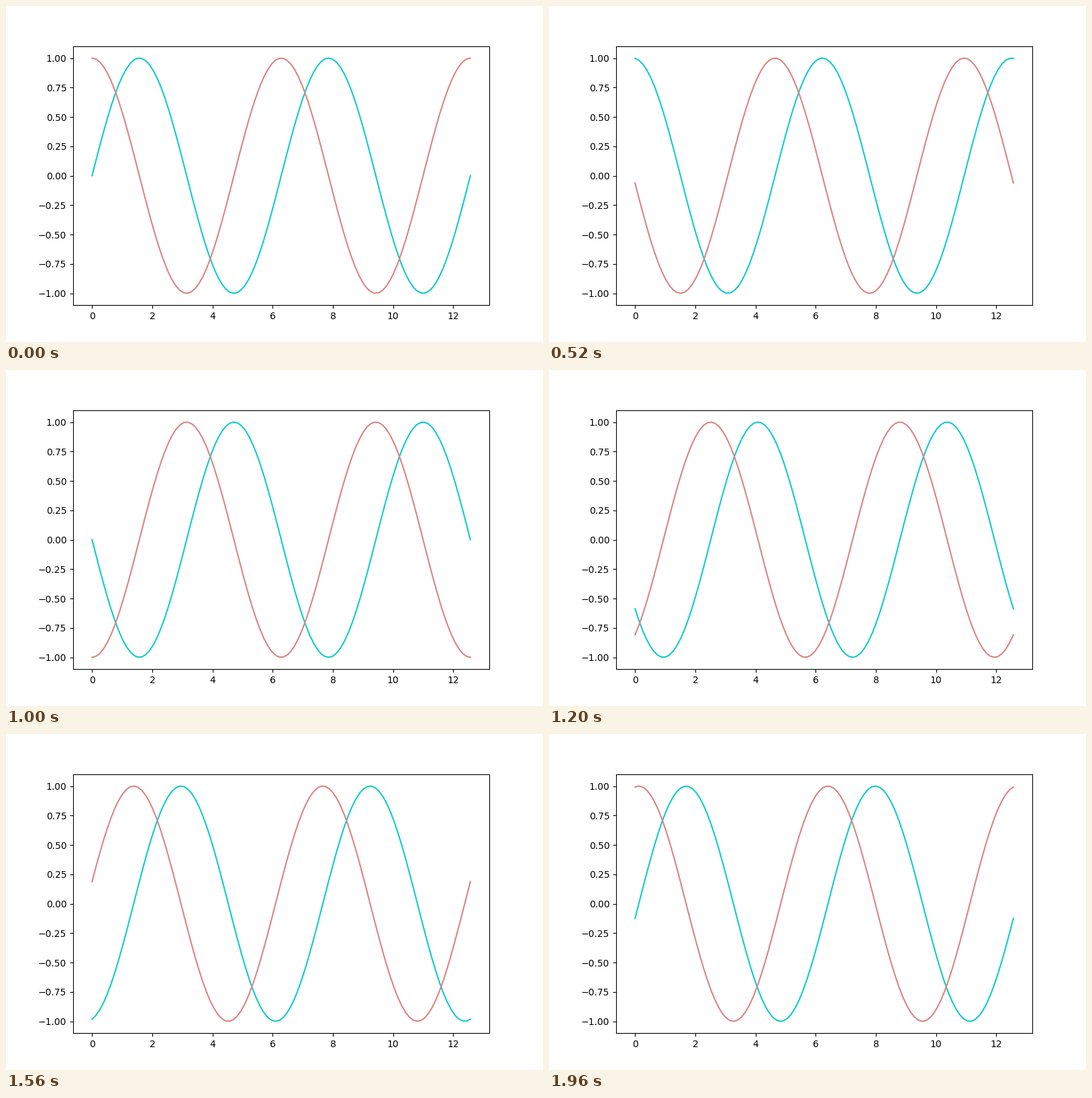
A matplotlib script that plays this animation: 800x500 px, repeating every 2 s.

```python
import numpy as np
import matplotlib.pyplot as plt
from matplotlib.animation import FuncAnimation

FRAMES = 50
INTERVAL = 40

x = np.linspace(0, 4 * np.pi, 100)

fig, ax = plt.subplots(figsize=(8, 5), dpi=100)
sin_line, = ax.plot(x, np.sin(x), color="#11cbca", lw=1.5)
cos_line, = ax.plot(x, np.cos(x), color="#da8582", lw=1.5)


def update(i):
    # Both waves travel left by one full period per loop
    phase = x + 2 * np.pi * i / FRAMES
    sin_line.set_ydata(np.sin(phase))
    cos_line.set_ydata(np.cos(phase))
    return sin_line, cos_line


anim = FuncAnimation(fig, update, frames=FRAMES, interval=INTERVAL,
                     repeat=True, repeat_delay=0)
plt.show()
```
